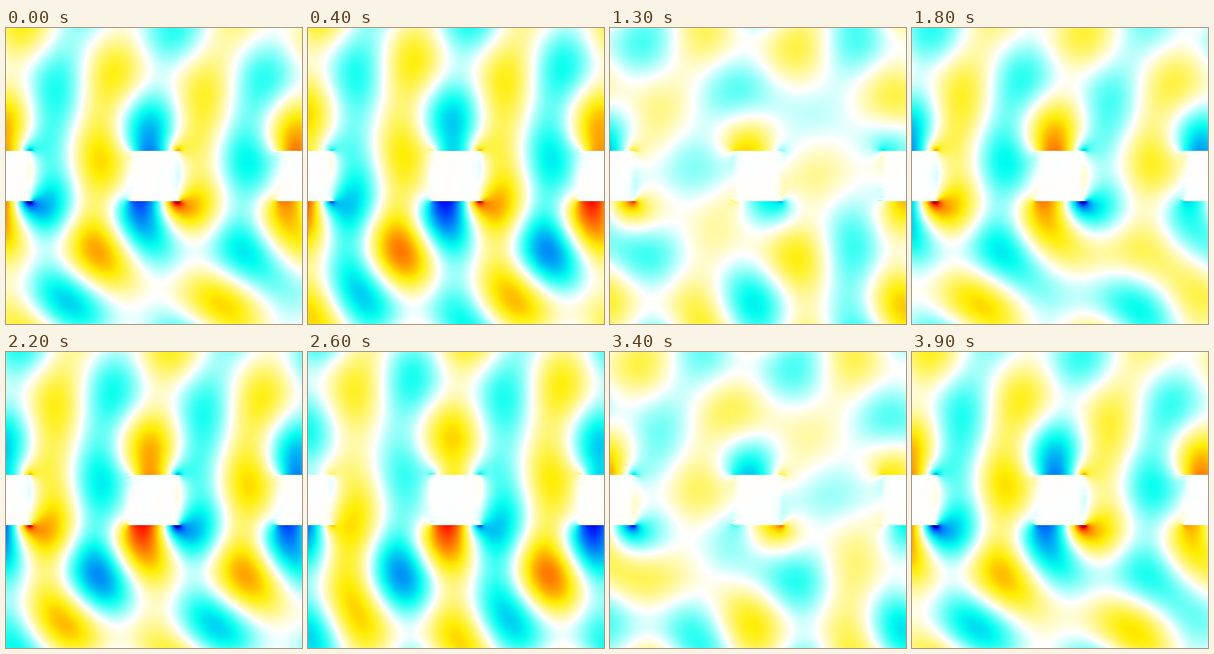
Recreate the animation shown at these times as a matplotlib script. Size 400x400 px, loop 4 s.

```python
"""Plane wave crossing a grating of square metal rods (TM, vertical electric field)."""
import numpy as np
import matplotlib.pyplot as plt
from matplotlib.animation import FuncAnimation
from matplotlib.colors import LinearSegmentedColormap

SIZE, CELL = 400, 2
FRAMES, INTERVAL = 40, 100
WAVELENGTH = SIZE / 3
PERIOD = SIZE / 2
ROD = WAVELENGTH / 2
ANGLE = np.radians(21.5)
EPS = (0.5 + 5j) ** 2
ORDERS = 40

K0 = 2 * np.pi / WAVELENGTH
FLOOR = SIZE / 2 + ROD / 2      # lower face of the rods
DEPTH = K0 * ROD

m = np.arange(-ORDERS, ORDERS + 1)
kx = np.sin(ANGLE) + m * WAVELENGTH / PERIOD
gamma = np.sqrt(1 - kx ** 2 + 0j)
incident = (m == 0).astype(complex)
taper = np.sinc(m / (ORDERS + 1)) ** 2      # suppresses Gibbs ripples


def toeplitz(rod_value):
    """Fourier matrix of a profile that is 1 outside the rods."""
    fill = ROD / PERIOD
    diff = m[:, None] - m[None, :]
    return (rod_value - 1) * fill * np.sinc(diff * fill) + np.eye(len(m))


def solve_layer():
    """Match the modes between the rods to the waves below and above."""
    eps_inv = np.linalg.inv(toeplitz(EPS))
    inv = toeplitz(1 / EPS)
    wave = kx[:, None] * eps_inv * kx[None, :] - np.eye(len(m))
    q2, w = np.linalg.eig(np.linalg.solve(inv, wave))
    q = np.sqrt(q2 + 0j)
    v = inv @ w * q
    decay = np.exp(-q * DEPTH)
    gw = 1j * gamma[:, None] * w
    system = np.block([[gw - v, (gw + v) * decay],
                       [-(v + gw) * decay, v - gw]])
    drive = np.concatenate([2j * gamma * incident, 0 * incident])
    up, down = np.split(np.linalg.solve(system, drive), 2)
    return eps_inv, w, q, up, down, decay


def complex_field():
    eps_inv, w, q, up, down, decay = solve_layer()
    reflected = w @ (up + decay * down) - incident
    passed = w @ (decay * up + down)
    centres = np.arange(CELL / 2, SIZE, CELL)
    rows = []
    for z in K0 * (FLOOR - centres):
        if z < 0:
            h = (incident * np.exp(1j * gamma[ORDERS] * z)
                 + reflected * np.exp(-1j * gamma * z))
            rows.append(kx * h)
        elif z > DEPTH:
            rows.append(kx * passed * np.exp(1j * gamma * (z - DEPTH)))
        else:
            h = w @ (np.exp(-q * z) * up + np.exp(-q * (DEPTH - z)) * down)
            rows.append(eps_inv @ (kx * h))
    return (np.array(rows) * taper) @ np.exp(1j * K0 * np.outer(kx, centres))


def turn(step):
    return np.exp(-2j * np.pi * step / FRAMES)


def calibrate(raw):
    """Set gain and phase from one crest below and one trough above the rods."""
    seen = np.array([raw[298 // CELL, 122 // CELL], raw[80 // CELL, 65 // CELL]])
    wanted = np.array([0.65 * turn(-4), -0.28 * turn(0)])
    return raw * np.vdot(seen, wanted) / np.vdot(seen, seen)


STOPS = [
    (-1.00, (0, 0, 160)), (-0.85, (0, 30, 255)), (-0.35, (0, 255, 240)),
    (0.00, (255, 255, 255)),
    (0.35, (255, 238, 0)), (0.85, (255, 25, 0)), (1.00, (180, 0, 0)),
]
cmap = LinearSegmentedColormap.from_list(
    "wave", [((v + 1) / 2, tuple(c / 255 for c in rgb)) for v, rgb in STOPS], N=512)

field = calibrate(complex_field())

fig = plt.figure(figsize=(4, 4), dpi=100)
ax = fig.add_axes([0, 0, 1, 1])
ax.axis("off")
image = ax.imshow(field.real, cmap=cmap, vmin=-1, vmax=1,
                  interpolation="nearest", aspect="auto")


def update(i):
    image.set_data((field * turn(i)).real)
    return [image]


anim = FuncAnimation(fig, update, frames=FRAMES, interval=INTERVAL,
                     repeat=True, repeat_delay=0)
plt.show()
```
